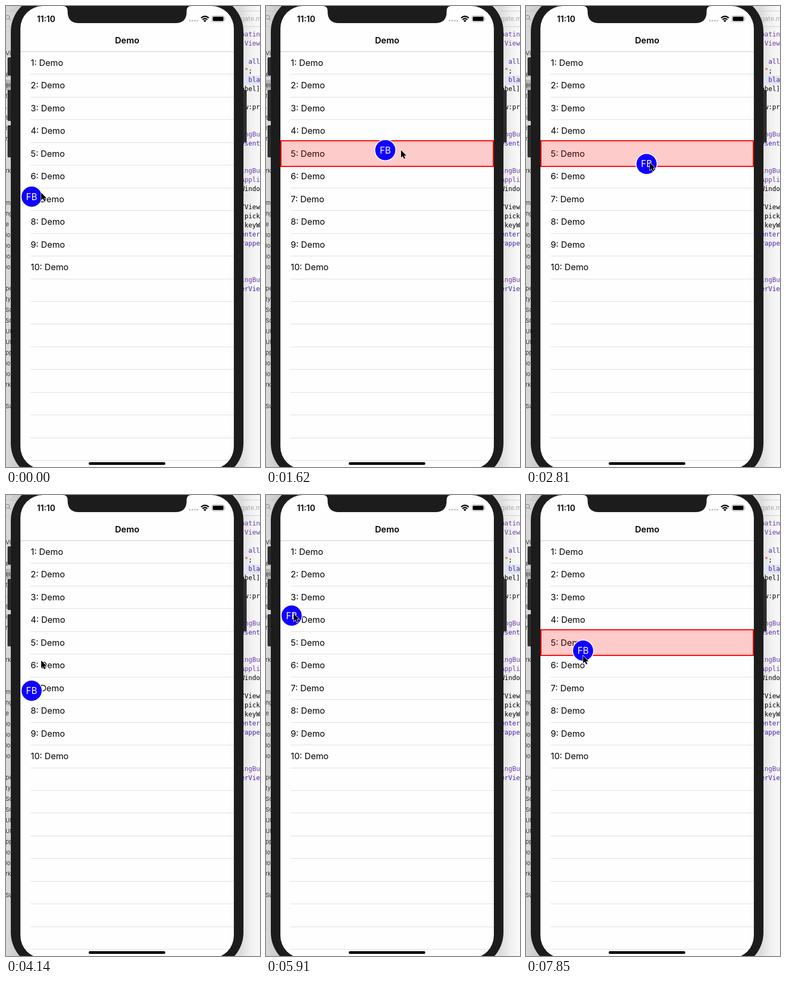
Recreate the animation shown at these times as an HTML page. Size 476 by 862 pixels, loop 8000 ms.

```html
<!DOCTYPE html>
<html lang="en">
<head>
<meta charset="utf-8">
<title>Floating button demo</title>
<style>
  html, body { margin: 0; width: 100%; height: 100%; overflow: hidden; background: #eee; }
  svg { display: block; width: 476px; height: 862px; }
  text { font-family: Inter, "Open Sans", sans-serif; white-space: pre; }
  .code text { font: 12px "DejaVu Sans Mono", monospace; }
  .side text { font-size: 11px; fill: #333; }
  .row { font-size: 16.2px; }
</style>
</head>
<body>
<svg viewBox="0 0 476 862">
  <defs>
    <linearGradient id="leftShade">
      <stop stop-color="#d9d9d9"/><stop offset="1" stop-color="#c2c2c2"/>
    </linearGradient>
    <linearGradient id="rightShade">
      <stop stop-color="#dcdcdc"/><stop offset=".5" stop-color="#f0f0f0"/><stop offset="1" stop-color="#f9f9f9"/>
    </linearGradient>
    <clipPath id="screen"><rect x="27" width="400" height="866" rx="42"/></clipPath>
  </defs>

  <!-- editor behind the phone -->
  <rect width="35" height="862" fill="url(#leftShade)"/>
  <rect x="415" width="61" height="862" fill="#dcdcdc"/>
  <rect x="440" width="36" height="862" fill="url(#rightShade)"/>
  <path d="M0 9.5H30M0 38.5H30M440 9.5H476M440 38.5H476" stroke="#bbb" stroke-opacity=".7"/>
  <circle cx="3" cy="21" r="3.6" fill="none" stroke="#777"/>
  <path d="M5.6 23.8L9 27.5" stroke="#777"/>
  <rect y="138" width="12" height="20" fill="#b5b5b5"/>
  <rect x="444" y="130" width="32" height="17" fill="#dfe5f2"/>
  <text x="440" y="28" font-size="12" fill="#aaa">gate.m</text>
  <g class="side" id="side"></g>
  <g class="code" id="code"><text x="447" y="125"><tspan fill="#c41a16">"</tspan>;</text></g>

  <!-- phone -->
  <g fill="#2e2e2e">
    <rect x="3" y="96" width="9" height="34" rx="2"/>
    <rect x="3" y="157" width="9" height="58" rx="2"/>
    <rect x="3" y="223" width="9" height="60" rx="2"/>
    <rect x="442" y="157" width="9" height="98" rx="2"/>
  </g>
  <rect x="9" y="-18" width="436" height="902" rx="66" fill="#1c1c1c"/>
  <g clip-path="url(#screen)">
    <rect x="27" width="400" height="866" fill="#fefefe"/>
    <text x="58" y="29.5" font-size="15.3" font-weight="600">11:10</text>
    <path d="M344.3 27.6h15" stroke="#c6c6c6" stroke-width="3.6" stroke-linecap="round" stroke-dasharray="0 4.8"/>
    <path d="M365.6 22.4Q372.8 16.2 380 22.4M368.3 25.4Q372.8 21.6 377.3 25.4" fill="none" stroke="#000" stroke-width="2.3"/>
    <path d="M370 27.3Q372.8 25.2 375.6 27.3L372.8 30.2Z"/>
    <rect x="386" y="18.5" width="23" height="11" rx="3" fill="none" stroke="#999"/>
    <rect x="387.5" y="20" width="20" height="8" rx="1.7"/>
    <path d="M410.5 22V26Q412.2 24 410.5 22Z" fill="#999"/>
    <text x="227" y="69.7" font-size="16.2" font-weight="600" text-anchor="middle">Demo</text>
    <path d="M27 85.5H427" stroke="#c9c9c9"/>
    <g id="rows"></g>
    <rect id="mark" x="28" width="398" height="48" fill="#f00" fill-opacity=".2" stroke="#f00" stroke-width="2"/>
    <rect id="dim" x="27" width="400" height="866" fill="#6e6e6e" fill-opacity=".42"/>
    <text id="present" x="123.5" y="151" font-size="15.6">presentView</text>
  </g>
  <path d="M106 -3V0Q115.5 0 115.5 9V11Q115.5 32 137 32H317Q338.5 32 338.5 11V9Q338.5 0 348 0V-3Z" fill="#1c1c1c"/>
  <rect x="155" y="853" width="143.5" height="5" rx="2.5"/>

  <g id="button">
    <circle r="20.5" fill="#fff"/>
    <circle r="18.9" fill="#1000ff"/>
    <text y="6" font-size="16.8" fill="#fff" text-anchor="middle">FB</text>
  </g>
  <path id="cursor" d="M0 .5V14.5L3.3 11.6L5.6 16.8L7.9 15.8L5.7 10.8H10Z" stroke="#fff" stroke-width="1.4" paint-order="stroke"/>
</svg>

<script>
const $ = id => document.getElementById(id);
const LOOP = 8000, TICK = 148.1, LEAD = 15, LAST_TICK = 53;
const LIST_TOP = 85.3, ROW = 42.47;

const add = (parent, tag, attrs, content = '') => {
  const el = document.createElementNS('http://www.w3.org/2000/svg', tag);
  for (const name in attrs) el.setAttribute(name, attrs[name]);
  el.textContent = content;
  parent.append(el);
};

for (let i = 1; i <= 18; i++) {
  const y = Math.floor(LIST_TOP + i * ROW) + .5;
  add($('rows'), 'path', { d: `M46 ${y}H427`, stroke: '#dedede' });
  if (i <= 10) add($('rows'), 'text', { class: 'row', x: 46.3, y: 69.4 + i * ROW }, `${i}: Demo`);
}

// One label per grid line; blanks are gaps.
'View||ele|ele|t|.|s|is|n|||rk|||me|ng|e|lo|lo|lo|lo||pe|ty|Scr|Scr|UIV|UIV|pp|lo|lo|rk||Su'
  .split('|').forEach((label, i) => add($('side'), 'text', { x: -1, y: 92 + i * 20 }, label));

// A leading + or - picks the syntax colour.
const syntax = { '+': '#703daa', '-': '#4b21b0' };
'+patin|+View||- all||- bla|abel]||w:pr|||+ingBu|-esent|||+ingBu|+Appli|Windo||/View|.pick|.keyW|-enter|-rappe||||+ingBu|-erVie'
  .split('|').forEach((entry, i) => {
    const code = entry.replace(/^[+-]/, '');
    add($('code'), 'text', { x: 476 - code.length * 7.22, y: 57 + i * 17, fill: syntax[entry[0]] || '#000' }, code);
  });

// Key points as [tick, x, y]: the dragged button, and the pointer relative to it.
const drag = [
  [0, 48, 356.5], [7, 167, 367], [8, 178, 440], [12, 232, 238], [15, 215, 449], [17, 300, 345],
  [20, 200, 278], [27, 48, 366], [28, 48, 366], [31, 150, 230], [34, 48, 225.5], [51, 48, 225.5], [53, 107, 291]
];
const grip = [
  [0, 18, -8], [7, 0, 27], [15, 59, -28], [20, 0, 0], [28, 18, -57], [34, 114, -45], [40, 4, -4], [51, 4, -4], [53, 0, 9]
];

const ease = k => k * k * (3 - 2 * k);
const along = (keys, tick) => {
  const next = Math.max(1, keys.findIndex(key => key[0] >= tick));
  const [start, x0, y0] = keys[next - 1], [end, x1, y1] = keys[next];
  const k = ease((tick - start) / (end - start));
  return [x0 + (x1 - x0) * k, y0 + (y1 - y0) * k];
};
const within = (tick, from, to) => tick >= from && tick < to;
const show = (id, on) => $(id).setAttribute('visibility', on ? 'visible' : 'hidden');
const move = (id, x, y) => $(id).setAttribute('transform', `translate(${x} ${y})`);

function draw() {
  const time = performance.now() % LOOP;
  const tick = Math.min(LAST_TICK, Math.floor((time + LEAD) / TICK));
  const [x, y] = along(drag, tick);
  const [dx, dy] = along(grip, tick);
  const row = Math.floor((y - LIST_TOP) / ROW);

  move('button', x, y);
  move('cursor', x + dx, y + dy);
  move('mark', 0, Math.round(82 + row * ROW));
  show('mark', within(tick, 2, 26) || within(tick, 29, 32) || tick === LAST_TICK);
  show('dim', within(tick, 43, 52));
  show('present', within(tick, 47, 52));
  requestAnimationFrame(draw);
}
draw();
</script>
</body>
</html>
```
